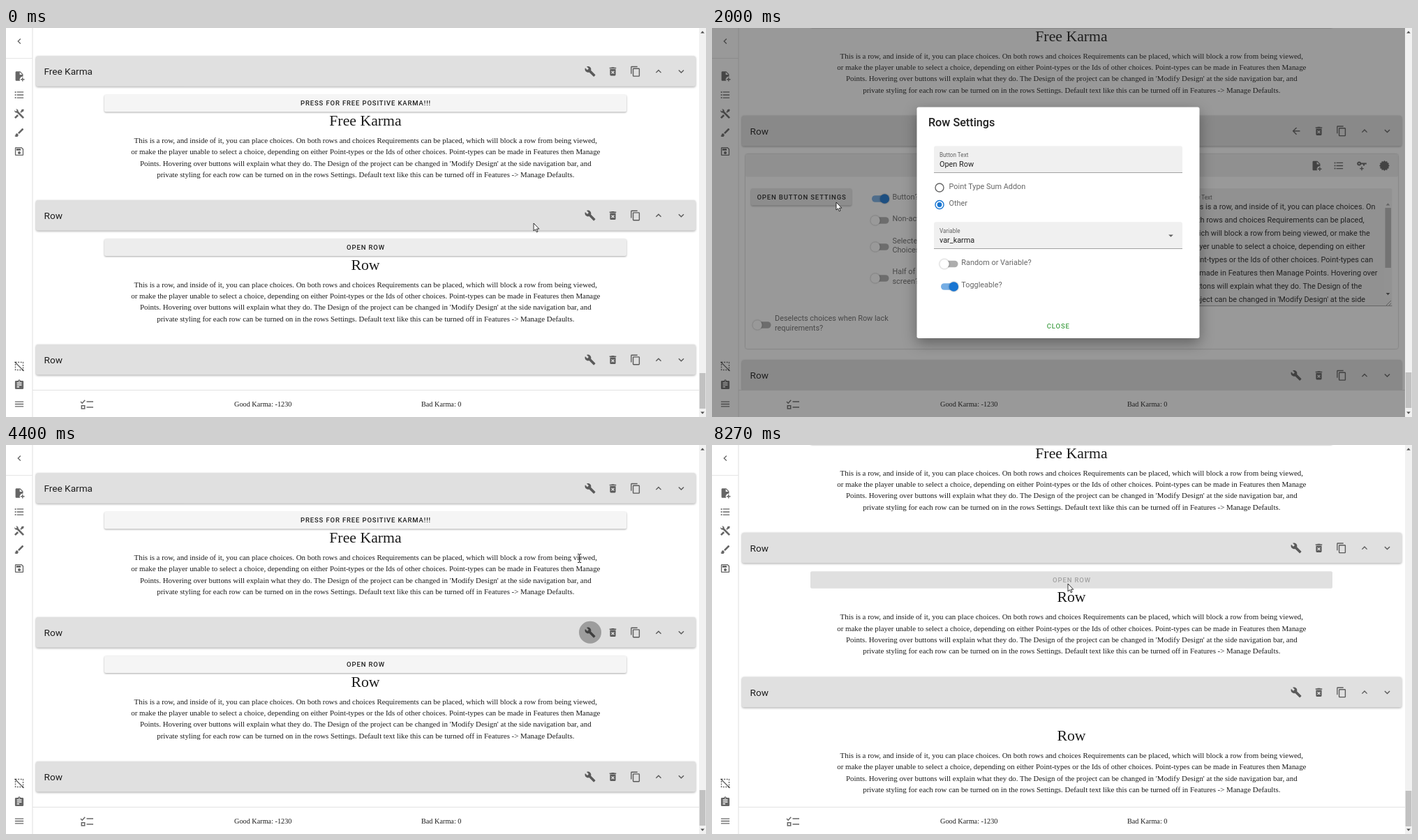
An HTML page for the animation above (8870 ms loop, 1003x558 px).

```html
<!DOCTYPE html>
<html lang="en">
<head>
<meta charset="utf-8">
<title>Row editor</title>
<style>
html, body { margin: 0; width: 100%; height: 100%; overflow: hidden; background: #fff; }
svg { display: block; position: absolute; left: 0; top: 0; }
text { font-family: Roboto, sans-serif; white-space: pre; }
.serif { font-family: "Liberation Serif", "Times New Roman", serif; }
.caps { font-weight: 500; letter-spacing: .0893em; }
.bar { filter: drop-shadow(0 1.5px 1.5px rgba(0,0,0,.34)); }
.raised { filter: drop-shadow(0 1.2px .9px rgba(0,0,0,.34)); }
.card { filter: drop-shadow(0 .7px 1.2px rgba(0,0,0,.36)); }
.knob { filter: drop-shadow(0 .8px 1px rgba(0,0,0,.4)); }
.modal { filter: drop-shadow(0 7px 10px rgba(0,0,0,.36)); }
</style>
</head>
<body>
<svg id="stage" width="1003" height="558" viewBox="0 0 1003 558"></svg>
<script>
const LOOP = 8870;
const INK = 'rgba(0,0,0,.87)', SOFT = 'rgba(0,0,0,.6)', BLUE = '#1976d2';
const UI = 10.89, SMALL = 8.17, CAPS = 9.53, HEAD = 13.6;

const dot = y => `M4,${y - 1.5}a1.5,1.5 0 1,1 0,3a1.5,1.5 0 1,1 0,-3M7,${y - 1}H21V${y + 1}H7Z`;
const ICONS = {
  wrench: 'M22.7,19L13.6,9.9C14.5,7.6 14,4.9 12.1,3C10.1,1 7.1,.6 4.7,1.7L9,6L6,9L1.6,4.7C.4,7.1 .9,10.1 2.9,12.1C4.8,14 7.5,14.5 9.8,13.6L18.9,22.7C19.3,23.1 19.9,23.1 20.3,22.7L22.6,20.4C23.1,20 23.1,19.3 22.7,19Z',
  bin: 'M6,19A2,2 0 0,0 8,21H16A2,2 0 0,0 18,19V7H6V19M8.46,11.88L9.87,10.47L12,12.59L14.12,10.47L15.53,11.88L13.41,14L15.53,16.12L14.12,17.53L12,15.41L9.88,17.53L8.47,16.12L10.59,14L8.46,11.88M15.5,4L14.5,3H9.5L8.5,4H5V6H19V4Z',
  copy: 'M19,21H8V7H19M19,5H8A2,2 0 0,0 6,7V21A2,2 0 0,0 8,23H19A2,2 0 0,0 21,21V7A2,2 0 0,0 19,5M16,1H4A2,2 0 0,0 2,3V17H4V3H16Z',
  up: 'M7.41,15.41L12,10.83L16.59,15.41L18,14L12,8L6,14Z',
  down: 'M7.41,8.58L12,13.17L16.59,8.58L18,10L12,16L6,10Z',
  left: 'M15.41,16.58L10.83,12L15.41,7.41L14,6L8,12L14,18Z',
  back: 'M20,11V13H8L13.5,18.5L12.08,19.92L4.16,12L12.08,4.08L13.5,5.5L8,11Z',
  addFile: 'M14,2H6C4.9,2 4,2.9 4,4V20C4,21.1 4.9,22 6,22H13.8C13.3,21.1 13,20 13,19C13,15.7 15.7,13 19,13L20,13.1V8L14,2M13,9V3.5L18.5,9H13M23,20H20V23H18V20H15V18H18V15H20V18H23Z',
  list: [6, 12, 18].map(dot).join(''),
  tools: 'M21.7,20.3L20.3,21.7A1,1 0 0 1 18.9,21.7L7,9.85A3.8,3.8 0 0 1 6,10A4,4 0 0 1 2.2,4.7L4.76,7.24L7.24,4.76L4.7,2.2A4,4 0 0 1 10,6A3.8,3.8 0 0 1 9.85,7L21.7,18.9A1,1 0 0 1 21.7,20.3M2.3,18.9A1,1 0 0 0 2.3,20.3L3.7,21.7A1,1 0 0 0 5.1,21.7L10.6,16.25L7.76,13.4ZM20,2L16,4V6L13.8,8.2L15.8,10.2L18,8H20L22,4Z',
  brush: 'M20.7,4.6L19.4,3.3C19,2.9 18.3,2.9 18,3.3L9,12.25L11.75,15L20.7,6C21.1,5.6 21.1,5 20.7,4.6M7,14A3,3 0 0,0 4,17C4,18.3 2.8,19 2,19C2.9,20.2 4.5,21 6,21A4,4 0 0,0 10,17A3,3 0 0,0 7,14Z',
  save: 'M17,3H5C3.9,3 3,3.9 3,5V19C3,20.1 3.9,21 5,21H19C20.1,21 21,20.1 21,19V7L17,3M19,19H5V5H16.2L19,7.8V19M12,12a3,3 0 1,0 .01,0M6,6H15V10H6Z',
  board: 'M19,3H14.8C14.4,1.8 13.3,1 12,1C10.7,1 9.6,1.8 9.2,3H5A2,2 0 0,0 3,5V19A2,2 0 0,0 5,21H19A2,2 0 0,0 21,19V5A2,2 0 0,0 19,3M7,7H17V9H7V7M12,17H7V15H12V17M17,13H7V11H17V13M12,3a1,1 0 1,1 -.01,0',
  menu: 'M3,6H21V8H3ZM3,11H21V13H3ZM3,16H21V18H3Z',
  key: 'M6.5,3C8.5,3 10.1,4.25 10.7,6H22V9H18V12H15V9H10.7C10.1,10.75 8.5,12 6.5,12C4,12 2,10 2,7.5C2,5 4,3 6.5,3M6.5,6a1.5,1.5 0 1,0 .01,0M8,17H11V14H13V17H16V19H13V22H11V19H8Z',
  caret: 'M7,10L12,15L17,10Z'
};

// Markup helpers; text is placed by the middle of its capitals.
const rect = (x, y, w, h, fill, more = '') => `<rect x="${x}" y="${y}" width="${w}" height="${h}" fill="${fill}" ${more}/>`;
const circle = (x, y, r, fill, more = '') => `<circle cx="${x}" cy="${y}" r="${r}" fill="${fill}" ${more}/>`;
const path = (d, more) => `<path d="${d}" ${more}/>`;
const group = (id, body, more = '') => `<g id="${id}" ${more}>${body}</g>`;
const text = (x, y, s, size = UI, fill = INK, more = '') =>
  `<text x="${x}" y="${(y + size * .355).toFixed(2)}" font-size="${size}" fill="${fill}" ${more}>${s}</text>`;
const serif = (x, y, s, size, more = '') => text(x, y - size * .025, s, size, '#1c1c1c', `class="serif" ${more}`);
const mid = 'text-anchor="middle"';
const caps = (x, y, s, fill = INK, more = '') => text(x, y, s, CAPS, fill, `class="caps" ${mid} ${more}`);
const icon = (name, x, y, more = '') =>
  path(ICONS[name], `fill="${SOFT}" fill-rule="evenodd" transform="translate(${x - 8.16} ${y - 8.16}) scale(.68)" ${more}`);

const COPY = [
  'This is a row, and inside of it, you can place choices. On both rows and choices Requirements can be placed, which will block a row from being viewed,',
  'or make the player unable to select a choice, depending on either Point-types or the Ids of other choices. Point-types can be made in Features then Manage',
  "Points. Hovering over buttons will explain what they do. The Design of the project can be changed in 'Modify Design' at the side navigation bar, and",
  'private styling for each row can be turned on in the rows Settings. Default text like this can be turned off in Features -&gt; Manage Defaults.'
];
const AREA = [
  'This is a row, and inside of it, you can place choices. On',
  'both rows and choices Requirements can be placed,',
  'which will block a row from being viewed, or make the',
  'player unable to select a choice, depending on either',
  'Point-types or the Ids of other choices. Point-types can',
  'be made in Features then Manage Points. Hovering over',
  'buttons will explain what they do. The Design of the',
  'project can be changed in \'Modify Design\' at the side'
];

const header = (y, title, first = icon('wrench', 837, y + 22)) =>
  rect(43, y, 945, 43.5, '#e0e0e0', 'rx="2.7" class="bar"') + text(54.5, y + 21.9, title, HEAD) + first +
  icon('bin', 869.5, y + 22) + icon('copy', 902, y + 22) + icon('up', 935, y + 22) + icon('down', 967.5, y + 22);

const prose = (y, title) => serif(515, y, title, 21.8, mid) +
  COPY.map((s, i) => serif(515.3, y + 28.6 + i * 16.33, s, UI, mid)).join('');

const wideButton = (y, label, id) =>
  rect(141, y, 748, 24.5, '#f5f5f5', `id="${id}" rx="2" class="raised"`) + caps(515.5, y + 11.9, label, INK, `id="${id}Label"`);

const toggle = (x, y, on, id = 'sw') =>
  rect(x, y - 4.8, 24.5, 9.6, on ? BLUE : '#000', `rx="4.8" opacity="${on ? .6 : .32}" class="${id}Track"`) +
  circle(x + (on ? 18.4 : 5), y, 6.7, on ? BLUE : '#fff', `class="knob ${id}Knob"`);

const field = (x, y, w, label, value, caret) =>
  path(`M${x},${y + 38}V${y + 2.7}q0,-2.7 2.7,-2.7H${x + w - 2.7}q2.7,0 2.7,2.7V${y + 38}Z`, 'fill="rgba(0,0,0,.06)"') +
  rect(x, y + 37.7, w, .8, 'rgba(0,0,0,.45)') +
  (value ? text(x + 8, y + 12.8, label, SMALL, SOFT) + text(x + 8, y + 25.6, value) : text(x + 8, y + 19, label, UI, SOFT)) +
  (caret ? icon('caret', x + w - 16.5, y + 19.5) : '');

const tri = (x, y, d, fill = '#505050') => path(`M${x - 2.8},${y + d * 1.5}h5.6l-2.8,${-d * 3.2}z`, `fill="${fill}"`);

function settings() {
  const seal = Array.from({ length: 24 }, (_, i) => {
    const r = i % 2 ? 6 : 7.4, a = i * Math.PI / 12;
    return (963.5 + r * Math.cos(a)).toFixed(1) + ',' + (197.5 + r * Math.sin(a)).toFixed(1);
  }).join(' ');
  const switches = [[245, true, ['Button?'], 242], [276, false, ['Non-activatable?'], 273],
    [314, false, ['Selected', 'Choices?'], 305], [359, false, ['Half of the', 'screen?'], 349.5]];
  return rect(48, 181, 935, 279, '#fff', 'rx="2.7" class="card"') + rect(48, 181, 935, 32.5, '#ededed', 'rx="2"') +
    icon('addFile', 866, 197.5) + icon('list', 898, 197.5) + icon('key', 931, 197.5) +
    `<polygon points="${seal}" fill="${SOFT}"/>` +
    rect(56, 230, 144, 24.6, '#f5f5f5', 'rx="2.7" class="raised" id="setBtn"') +
    `<g clip-path="url(#setClip)">${circle(172, 246, 0, '#000', 'id="setRipple"')}</g>` +
    caps(128.5, 242.4, 'OPEN BUTTON SETTINGS') +
    switches.map(([y, on, lines, ly]) => toggle(229, y, on) +
      lines.map((s, i) => text(258.5, ly + i * 13.4, s, UI, SOFT)).join('')).join('') +
    toggle(60, 426, false) + text(90, 416.3, 'Deselects choices when Row lack', UI, SOFT) + text(90, 429.8, 'requirements?', UI, SOFT) +
    field(366, 230, 144, 'Template', 'Image Top', true) + field(366, 288.5, 144, 'Row Title', 'Row') +
    field(366, 347, 144, 'Allowed Choices', '0') +
    field(521, 230, 143.5, 'Objects Per Row', '4 per Row', true) + field(521, 268, 143.5, 'Choices Justify', '', true) +
    field(521, 306, 143.5, 'Row Id', 'ugbh') + field(521, 344.3, 143.5, 'Selected Choices', '0') +
    rect(675.5, 230, 299, 169, 'rgba(0,0,0,.06)', 'rx="2"') + rect(675.5, 398.3, 299, .8, 'rgba(0,0,0,.45)') +
    text(683.5, 243, 'Row Text', SMALL, SOFT) +
    AREA.map((s, i) => text(683.7, 256 + i * 19.05, s)).join('') +
    rect(963.5, 248, 10, 139, '#f1f1f1') + rect(964.5, 258, 8.5, 86, '#b8b8b8') + tri(968.5, 253, 1, '#999') + tri(968.5, 381.5, -1) +
    path('M966,398l7,-7M970,398l3,-3', 'stroke="#777" stroke-width=".8"');
}

function dialog() {
  const radio = (y, on) => circle(326, y, 6, '#fff', `stroke="${on ? BLUE : '#666'}" stroke-width="1.4"`) + (on ? circle(326, y, 3.4, BLUE) : '');
  return rect(293.5, 113.5, 405, 331.5, '#fff', 'rx="2.7" class="modal"') +
    text(310, 135, 'Row Settings', 16.2, INK, 'font-weight="500"') +
    field(318, 169.3, 356, 'Button Text', 'Open Row') +
    radio(229, false) + text(339.5, 227, 'Point Type Sum Addon', UI, SOFT) +
    radio(253.5, true) + text(339.5, 251.5, 'Other', UI, SOFT) +
    field(318, 278.3, 356, 'Variable', 'var_karma', true) +
    toggle(328, 338.5, false) + text(357.3, 336.2, 'Random or Variable?', UI, SOFT) +
    circle(333, 371, 16, '#000', 'id="togRipple"') + toggle(328, 371, true, 'tog') + text(357.3, 368.6, 'Toggleable?', UI, SOFT) +
    caps(496.3, 427.6, 'CLOSE', '#43a047');
}

function chrome() {
  const side = ['addFile', 'list', 'tools', 'brush', 'save'];
  return rect(38, 520, 955, 38, '#fff') + rect(38, 519, 955, 1, '#e2e2e2') +
    path('M107,536l2.2,2.2l4,-4.4M115.5,536h9.5M115.5,544h9.5M108.3,541.7h4.4v4.4h-4.4z', `fill="none" stroke="${SOFT}" stroke-width="1.5"`) +
    serif(327, 539.6, 'Good Karma: -1230', 10.24) + serif(595, 539.6, 'Bad Karma: 0', 10.24) +
    rect(0, 0, 38, 558, '#fff') + rect(37.5, 0, 1, 558, '#e0e0e0') + rect(0, 43, 38, .8, '#e0e0e0') +
    icon('left', 19, 19) + side.map((n, i) => icon(n, 19, 69 + i * 27)).join('') +
    rect(13.5, 479.5, 11, 11, 'none', `stroke="${SOFT}" stroke-width="1.4" stroke-dasharray="2 1.6"`) +
    path('M12.5,479l13,13', `stroke="${SOFT}" stroke-width="1.4"`) + icon('board', 19, 512) + icon('menu', 19, 539.5);
}

document.getElementById('stage').innerHTML =
  `<defs><clipPath id="setClip">${rect(56, 230, 144, 24.6, '#000', 'rx="2.7"')}</clipPath>
   <clipPath id="rowClip">${rect(141, 302.5, 748, 24.5, '#000', 'rx="2"')}</clipPath></defs>` +
  rect(0, 0, 1003, 558, '#fff') +
  group('page',
    header(40.3, 'Free Karma') + wideButton(95.8, 'PRESS FOR FREE POSITIVE KARMA!!!', 'press') + prose(132.7, 'Free Karma') +
    header(247, 'Row', group('wrench', icon('wrench', 837, 269)) + group('back', icon('back', 837, 269)) +
      circle(837, 268.7, 16, '#000', 'id="wrenchRipple"')) +
    group('rowBody', wideButton(302.5, 'OPEN ROW', 'open') +
      `<g clip-path="url(#rowClip)">${circle(516.5, 314.5, 0, '#000', 'id="openRipple"')}</g>` + prose(339.5, 'Row')) +
    group('nextRow', header(454, 'Row')) + group('nextBody', prose(538, 'Row'))) +
  group('settings', settings()) + chrome() +
  rect(0, 0, 993, 558, '#212121', 'id="scrim"') + group('dialog', dialog()) +
  rect(993, 0, 10, 558, '#f1f1f1') + tri(998, 6, 1) + tri(998, 552, -1) + rect(993.7, 495, 8.6, 51, '#c1c1c1', 'id="thumb"') +
  group('arrow', path('M0,0V11L2.5,8.8L4.3,12.8L6,12L4.3,8.2H7.8Z', 'fill="#fff" stroke="#000" stroke-width=".8"')) +
  group('beam', path('M-2.5,-6H-.7L0,-5.3L.7,-6H2.5M0,-5.3V5.3M-2.5,6H-.7L0,5.3L.7,6H2.5', 'fill="none" stroke="#111" stroke-width="1"'));

const el = id => document.getElementById(id);
const set = (id, attrs) => { for (const k in attrs) el(id).setAttribute(k, attrs[k]); };
const show = (id, on) => { el(id).style.display = on ? '' : 'none'; };
const ramp = (t, a, b) => Math.min(1, Math.max(0, (t - a) / (b - a)));
const pulse = (t, a, b, c, d) => ramp(t, a, b) * (1 - ramp(t, c, d));
const smooth = p => p * p * (3 - 2 * p);
const within = (t, a, b) => t >= a && t < b;

// Pointer path: time, x, y
const POINTER = [
  [0, 756, 280], [70, 760, 279], [270, 832, 264], [690, 832, 264], [1400, 172, 247], [1720, 173, 248], [1800, 174, 249],
  [2000, 178, 250], [2330, 319, 307], [2400, 326, 318], [2530, 361, 378], [2800, 361, 378], [3470, 767, 282],
  [3600, 773, 280], [3700, 773, 280], [4180, 835, 149], [4300, 835, 149], [4400, 822, 162], [4530, 785, 236],
  [5130, 521, 318], [5800, 521, 318], [5930, 529, 204], [6180, 529, 204], [6420, 615, 318], [6660, 540, 470],
  [6860, 470, 370], [7070, 500, 207], [7130, 505, 204], [7300, 537, 190], [7500, 496, 201], [7700, 533, 212],
  [7870, 510, 205], [8190, 510, 205], [8270, 510, 199], [LOOP, 510, 199]
];
function pointer(t) {
  const i = POINTER.findIndex(p => p[0] > t), [ta, xa, ya] = POINTER[i - 1], [tb, xb, yb] = POINTER[i];
  const raw = (t - ta) / (tb - ta), p = tb - ta > 300 ? smooth(raw) : raw;
  return [xa + (xb - xa) * p, ya + (yb - ya) * p];
}

function draw(t) {
  const editing = within(t, 595, 4325), opened = t >= 5465;
  set('page', { transform: `translate(0 ${editing || opened ? -121.2 : 0})` });
  show('settings', editing); show('rowBody', !editing);
  show('wrench', !editing); show('back', editing);
  set('nextRow', { transform: `translate(0 ${editing ? 143.5 : 0})` });
  show('nextBody', opened);
  set('thumb', { y: opened ? 496 : editing ? 494 : 495 });

  set('wrenchRipple', { opacity: .3 * (pulse(t, 525, 590, 640, 900) + pulse(t, 4250, 4320, 4410, 4700)) });

  const hover = 1 - ramp(t, 0, 200) + pulse(t, 5020, 5150, 5460, 5465);
  const grey = Math.round(245 - 8 * Math.min(1, hover));
  set('open', { fill: opened ? '#e0e0e0' : `rgb(${grey},${grey},${grey})`, class: t >= 5560 ? '' : 'raised' });
  set('openLabel', { fill: opened ? 'rgba(0,0,0,.28)' : INK });
  set('openRipple', { r: 338 * ramp(t, 5270, 5470) + 40 * ramp(t, 5470, 5600), opacity: .09 * pulse(t, 5270, 5330, 5475, 5600) });

  set('setBtn', { fill: within(t, 1395, 2100) ? '#e8e8e8' : '#f5f5f5' });
  set('setRipple', { r: 97 * ramp(t, 1530, 1800) + 30 * ramp(t, 1800, 1900), opacity: .25 * pulse(t, 1530, 1600, 1810, 2000) });

  const dim = t < 3000 ? ramp(t, 1745, 1890) : 1 - ramp(t, 3575, 3875);
  set('scrim', { opacity: .46 * dim });
  const grow = 1 - Math.pow(1 - ramp(t, 1768, 1990), 2.4), size = .5 + .5 * grow;
  show('dialog', within(t, 1768, 3598));
  set('dialog', { opacity: grow, transform: `translate(496 279.3) scale(${size}) translate(-496 -279.3)` });

  const off = smooth(ramp(t, 2665, 2870)), isOff = off > .35;
  const knob = document.querySelector('.togKnob'), track = document.querySelector('.togTrack');
  knob.setAttribute('cx', 346.4 - 13.4 * off);
  knob.setAttribute('fill', isOff ? '#fff' : BLUE);
  track.setAttribute('fill', isOff ? '#000' : BLUE);
  track.setAttribute('opacity', isOff ? .32 : .6);
  set('togRipple', { cx: 346.4 - 13.4 * off, opacity: .14 * pulse(t, 2665, 2735, 2850, 3100) });

  const [x, y] = pointer(t), beam = within(t, 3595, 3720) || within(t, 4395, 4465);
  show('arrow', !beam); show('beam', beam);
  set(beam ? 'beam' : 'arrow', { transform: `translate(${x.toFixed(2)} ${y.toFixed(2)})` });
}

const start = performance.now();
function tick() {
  draw((performance.now() - start) % LOOP);
  requestAnimationFrame(tick);
}
tick();
</script>
</body>
</html>
```
